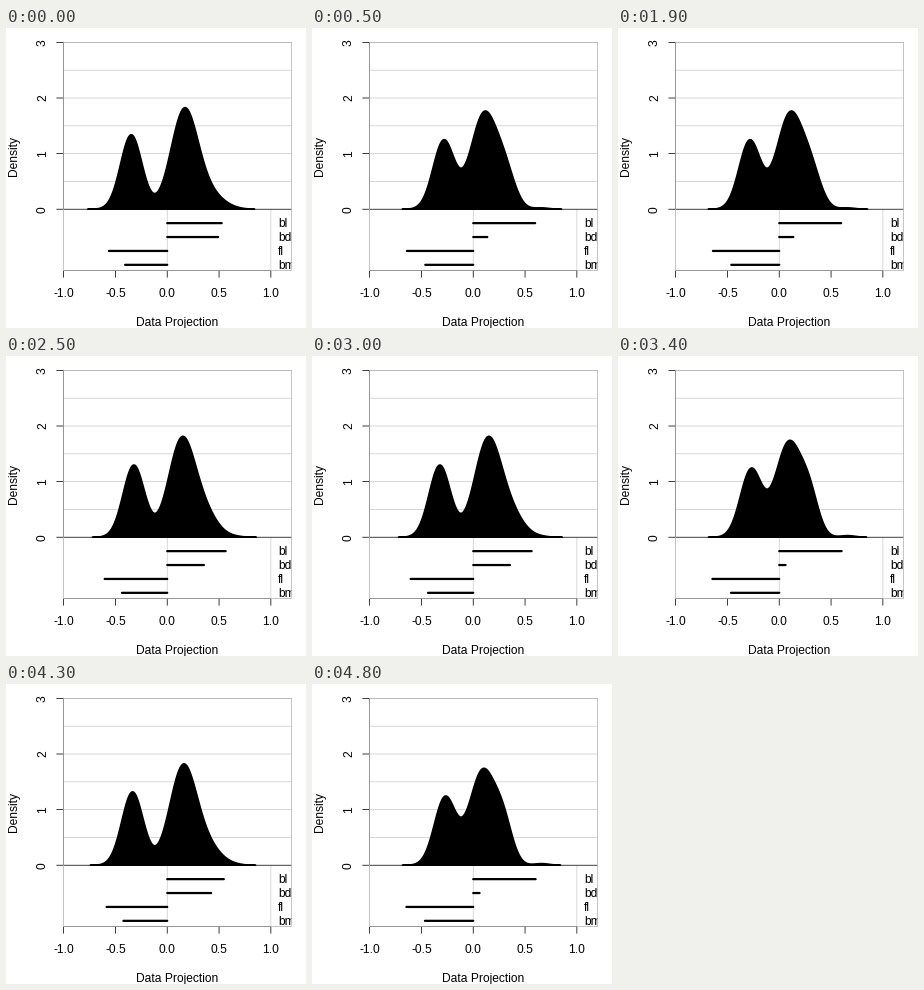
A matplotlib script for the animation above (5000 ms loop, 300x300 px).

```python
import numpy as np
import matplotlib
import matplotlib.pyplot as plt
from matplotlib.animation import FuncAnimation

matplotlib.rcParams["font.family"] = "Liberation Sans"
matplotlib.rcParams["path.snap"] = False

SIZE = 300
STEPS, SEGMENT = 6, 7          # six moves, then one held frame
FRAMES = 50
WIDE, NARROW = 29.4, 3.5       # projection angles in degrees
THIN = 0.75

# mean, sd and height of each bump at the wide and the narrow angle
BUMPS = [
    ((-0.347, 0.104, 1.34), (-0.272, 0.104, 1.21)),
    ((0.165, 0.130, 1.76), (0.092, 0.130, 1.70)),
    ((0.403, 0.145, 0.25), (0.297, 0.087, 0.58)),
    ((0.660, 0.070, 0.00), (0.660, 0.075, 0.03)),
]

# at 72 dpi one point is one pixel
fig = plt.figure(figsize=(SIZE / 72, SIZE / 72), dpi=72, facecolor="white")
ax = fig.add_axes([57.6 / SIZE, 57.6 / SIZE, 228 / SIZE, 228 / SIZE])
ax.set_xlim(-1, 1.2)
ax.set_ylim(-1.1, 3)
ax.axis("off")


def line(xs, ys, color="black", width=THIN, z=1, clip=False, cap="butt"):
    return ax.plot(xs, ys, color=color, lw=width, zorder=z, clip_on=clip,
                   solid_capstyle=cap)[0]


def label(x, y, text, turn=0):
    """Centred text with its baseline at a pixel position from the top left."""
    fig.text(x / SIZE, 1 - y / SIZE, text, size=12, rotation=turn,
             ha="center", va="baseline", rotation_mode="anchor")


def px(x):
    return 57.6 + (x + 1) * 228 / 2.2


def py(y):
    return 14.4 + (3 - y) * 228 / 4.1


# axes with outward ticks
TICK_X, TICK_Y = 7.2 * 2.2 / 228, 7.2 * 4.1 / 228
line([-1, 1], [-1.1, -1.1])
line([-1, -1], [0, 3])
for v in np.arange(-1, 1.1, 0.5):
    line([v, v], [-1.1, -1.1 - TICK_Y])
    label(px(v), 269, f"{v:.1f}")
for v in range(4):
    line([-1, -1 - TICK_X], [v, v])
    label(40, py(v), str(v), 90)
label(px(0.1), 298, "Data Projection")
label(11.5, py(0.95), "Density", 90)

# guides
for h in np.arange(0.5, 3.1, 0.5):
    line([-1, 1.2], [h, h], "0.8", z=2, clip=True)
for v, low in ((0, -1), (-1, -1.1), (1, -1.1)):
    line([v, v], [low, 0], "0.8", z=2, clip=True)

area, = ax.fill([0, 0, 0], [0, 0, 0], facecolor="black", edgecolor="black",
                lw=1.5, joinstyle="round", zorder=3)
line([-1, 1.2], [0, 0], z=4, clip=True)

rows = -np.arange(1, 5) / 4
bars = [line([0, 0], [y, y], width=2.25, z=5, clip=True, cap="round")
        for y in rows]
for y, name in zip(rows, ("bl", "bd", "fl", "bm")):
    ax.text(1 + 7 * 2.2 / 228, y - 4 * 4.1 / 228, name, size=12, zorder=5,
            ha="left", va="baseline", clip_on=True)
line([-1, 1.2, 1.2, -1, -1], [-1.1, -1.1, 3, 3, -1.1], "0.7", z=6,
     cap="projecting")


def progress(n):
    """Share of the way from the wide to the narrow angle."""
    if n == 0:
        return 0
    leg, step = divmod(n - 1, SEGMENT)
    t = min(step + 1, STEPS) / STEPS
    return t if leg % 2 == 0 else 1 - t


def density(x, t):
    total = np.zeros_like(x)
    for a, b in BUMPS:
        mean, sd, height = np.array(a) + (np.array(b) - np.array(a)) * t
        total += height * np.exp(-0.5 * ((x - mean) / sd) ** 2)
    return total


def draw(n):
    t = progress(n)
    angle = np.radians(WIDE + (NARROW - WIDE) * t)
    c = np.cos(angle)
    weights = (0.603 * c, np.sin(angle), -0.646 * c, -0.467 * c)
    for bar, w in zip(bars, weights):
        bar.set_xdata([0, w])

    left = -0.684 - 0.085 * (1 - t) ** 2
    right = 0.843 + 0.02 * np.sin(np.pi * t)
    x = np.linspace(left, right, 400)
    outline = np.column_stack([x, density(x, t)])
    area.set_xy(np.vstack([[left, 0], outline, [right, 0]]))
    return [area, *bars]


anim = FuncAnimation(fig, draw, frames=FRAMES, interval=100, repeat=True,
                     repeat_delay=0, blit=False)
plt.show()
```
